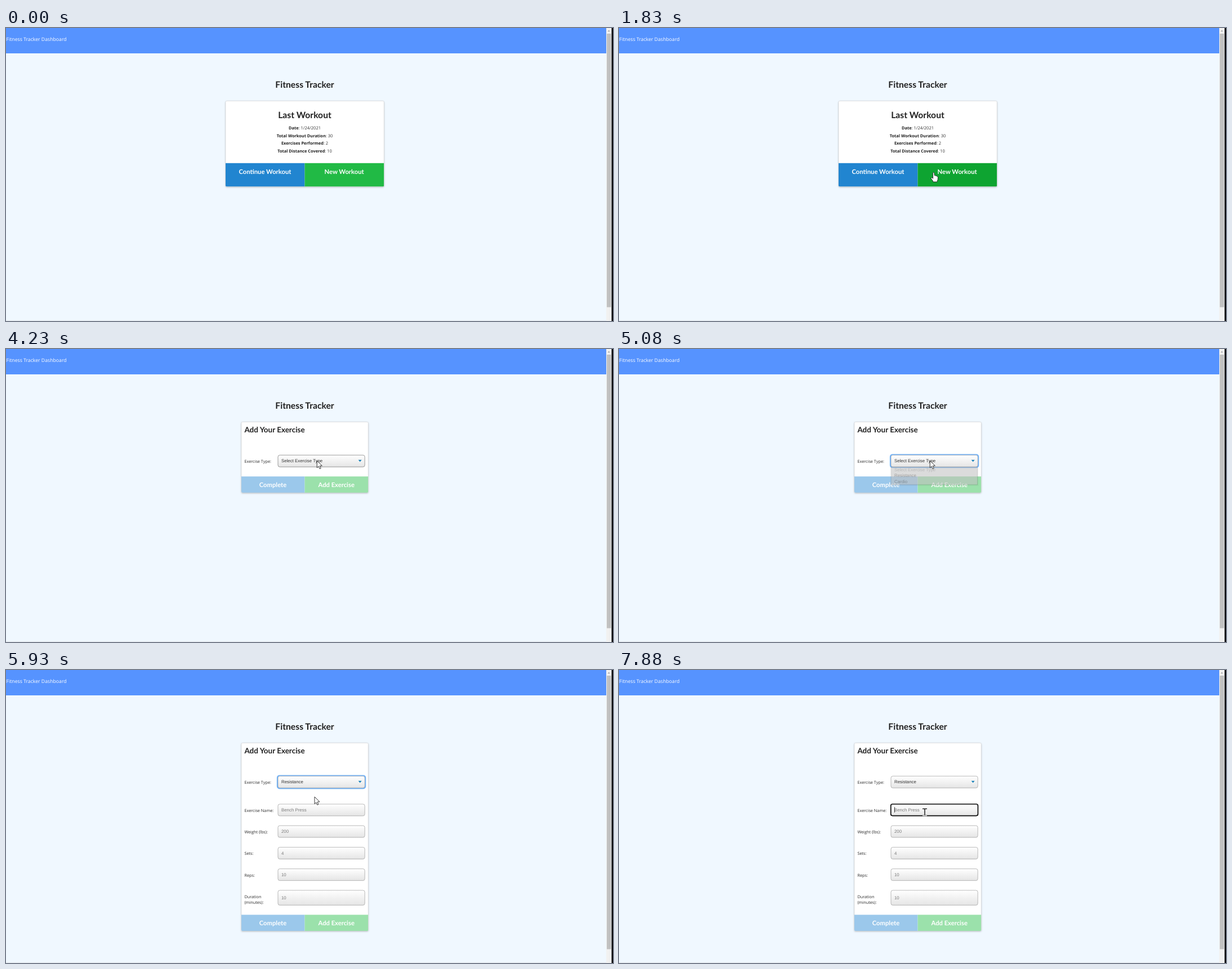
An HTML page with a canvas for the animation above (8000 ms loop, 1078 by 520 pixels).

```html
<!DOCTYPE html>
<html lang="en">
<head>
<meta charset="utf-8">
<title>Fitness Tracker</title>
<style>
html, body { margin: 0; width: 100%; height: 100%; overflow: hidden; background: #f0f8ff; }
canvas { display: block; width: 1078px; height: 520px; }
</style>
</head>
<body>
<canvas id="stage" width="1078" height="520"></canvas>
<script>
const ctx = document.getElementById('stage').getContext('2d');
const LOOP = 8000;
const UI = '"Open Sans", "Noto Sans", sans-serif';
const HEAD = 'Lato, sans-serif';
const FIELD = '"Liberation Sans", Arial, sans-serif';
const INK = '#212121';
const MID = 530.5;

// Pointer moves: start, end, steps, from, to
const moves = [
  [530, 590, 2, [1043, 520], [1065, 512]],
  [750, 1520, 11, [1065, 512], [557, 252]],
  [1590, 1830, 4, [557, 252], [558.5, 256.5]],
  [3370, 4060, 10, [558.5, 256.5], [552.3, 198.3]],
  [5470, 5700, 4, [552.3, 198.3], [548, 225]],
  [6480, 6720, 4, [548, 225], [543, 251.5]]
];
const clicks = [[1670, 1830], [4060, 4230], [5850, 5930], [6870, 7020]];

const within = (t, a, b) => t >= a && t < b;
const mix = (a, b, k) => a + (b - a) * k;
const ease = k => k * k * (3 - 2 * k);

// Fraction done of a stepped change whose first step shows at a, last at b
function stepped(t, a, b, n) {
  if (t < a) return 0;
  if (t >= b) return 1;
  return (Math.floor((t - a) / (b - a) * (n - 1)) + 1) / n;
}

function pointerAt(t) {
  let pos = null;
  for (const [a, b, n, from, to] of moves) {
    if (t < a) break;
    const k = ease(stepped(t, a, b, n));
    pos = [mix(from[0], to[0], k), mix(from[1], to[1], k)];
  }
  return pos;
}

function rect(x, y, w, h, color) {
  ctx.fillStyle = color;
  ctx.fillRect(x, y, w, h);
}

function round(x, y, w, h, r) {
  ctx.beginPath();
  ctx.roundRect(x, y, w, h, r);
}

function text(str, x, y, font, color, align = 'left') {
  ctx.font = font;
  ctx.fillStyle = color;
  ctx.textAlign = align;
  ctx.fillText(str, x, y);
}

function poly(points) {
  ctx.beginPath();
  points.forEach(([x, y]) => ctx.lineTo(x, y));
  ctx.closePath();
}

function page() {
  rect(0, 0, 1078, 520, '#f0f8ff');
  rect(0, 0, 1066, 45, '#5693ff');
  text('Fitness Tracker Dashboard', 0.6, 23.4, '8.7px ' + UI, '#fff');
  text('Fitness Tracker', MID, 106.3, '700 15.7px ' + HEAD, INK, 'center');
  rect(0, 519, 1066, 1, '#e2e6ea');
  rect(1066, 0, 9.5, 520, '#f1f1f1');
  rect(1067, 10, 7.5, 485.5, '#c1c1c1');
  ctx.fillStyle = '#a3a3a3';
  poly([[1068.4, 6.3], [1070.6, 3.8], [1072.8, 6.3]]);
  ctx.fill();
  rect(1075.5, 0, 2.5, 520, '#0b0b0d');
}

function card(x, y, w, h, split, left, right) {
  ctx.save();
  ctx.shadowColor = 'rgba(0,0,0,.28)';
  ctx.shadowBlur = 3;
  ctx.shadowOffsetY = 1;
  ctx.fillStyle = '#fff';
  round(x, y, w, h, 2.2);
  ctx.fill();
  ctx.restore();
  ctx.strokeStyle = '#d4d4d5';
  ctx.lineWidth = 0.6;
  ctx.stroke();
  ctx.save();
  ctx.clip();
  rect(x, split, MID - x, y + h - split, left);
  rect(MID, split, x + w - MID, y + h - split, right);
  ctx.restore();
}

function summary(t) {
  const k = stepped(t, 1590, 1750, 3);
  const green = `rgb(${mix(33, 14, k)},${mix(186, 164, k)},${mix(69, 49, k)})`;
  card(390, 129.5, 281.3, 152, 239.8, '#2185d0', green);
  text('Last Workout', MID, 159.9, '700 15.7px ' + HEAD, INK, 'center');
  const bold = '700 7.4px ' + UI, plain = '7.5px ' + UI;
  [['Date', '1/24/2021'], ['Total Workout Duration', '30'],
   ['Exercises Performed', '2'], ['Total Distance Covered', '10']].forEach(([name, val], i) => {
    const y = 180 + i * 13.55;
    val = ': ' + val;
    ctx.font = plain;
    const valWidth = ctx.measureText(val).width;
    ctx.font = bold;
    const nameWidth = ctx.measureText(name).width;
    const x = MID - (nameWidth + valWidth) / 2;
    text(name, x, y, bold, INK);
    text(val, x + nameWidth, y, plain, '#333');
  });
  const label = '700 11.23px ' + HEAD;
  text('Continue Workout', 460, 258.8, label, '#fff', 'center');
  text('New Workout', 600.6, 258.8, label, '#fff', 'center');
}

function field(y, h, str, color, border = '#aaa') {
  const fill = ctx.createLinearGradient(0, y, 0, y + h);
  fill.addColorStop(0, '#fff');
  fill.addColorStop(1, '#e5e5e5');
  round(482.6, y - 0.1, 155, h + 1.1, 3.5);
  ctx.fillStyle = 'rgba(0,0,0,.05)';
  ctx.fill();
  round(483, y, 154.2, h, 3.3);
  ctx.fillStyle = fill;
  ctx.fill();
  ctx.strokeStyle = border;
  ctx.lineWidth = 0.8;
  ctx.stroke();
  text(str, 489, y + h / 2 + 2.7, '7.86px ' + FIELD, color);
}

function label(str, y) {
  text(str, 423.4, y, '7.3px ' + UI, '#2b2b2b');
}

function outline(y, h, color, width) {
  round(482.7, y, 154.8, h, 3);
  ctx.strokeStyle = color;
  ctx.lineWidth = width;
  ctx.stroke();
}

function form(t) {
  const open = t >= 5930;
  const split = open ? 434.4 : 226.2;
  card(418, 129.5, 225.3, split + 28.7 - 129.5, split, '#9bc8eb', '#9be1ab');
  text('Add Your Exercise', 423.4, 148.4, '700 13.48px ' + HEAD, INK);
  const btn = '700 11.23px ' + HEAD;
  text('Complete', 474, split + 18.8, btn, '#fff', 'center');
  text('Add Exercise', 586.7, split + 18.8, btn, '#fff', 'center');

  label('Exercise Type:', 202);
  if (within(t, 5010, 6870)) outline(188.2, 21.2, 'rgba(59,153,252,.75)', 3.6);
  field(188.3, 20.9, open ? 'Resistance' : 'Select Exercise Type', '#303030',
    within(t, 3980, 5010) ? '#888' : '#aaa');
  ctx.fillStyle = '#1480b8';
  poly([[625.7, 196.7], [631.7, 196.7], [628.7, 200.2]]);
  ctx.fill();

  if (open) extraFields(t);
  else if (t >= 5010) menu(t);
}

function extraFields(t) {
  [['Exercise Name:', 238, 20.8, 'Bench Press', 251.6],
   ['Weight (lbs):', 276.2, 20.8, '200', 289.8],
   ['Sets:', 314.6, 20.8, '4', 328],
   ['Reps:', 352.8, 20.8, '10', 366.5],
   ['Duration', 391, 26.3, '10', 404.6]].forEach(([name, y, h, hint, base]) => {
    label(name, base);
    field(y, h, hint, '#7b7b7b');
  });
  label('(minutes):', 415.2);
  if (t >= 6870) {
    outline(238, 20.6, '#101010', 1.7);
    if (!within(t, 7420, 7880)) rect(489, 243.3, 0.9, 9.6, '#222');
  }
}

function menu(t) {
  const font = '7.86px ' + FIELD;
  const hot = t >= 5550;
  ctx.save();
  ctx.globalAlpha = stepped(t, 5010, 5160, 3);
  rect(484, 211, 154.5, 32, 'rgba(0,0,0,.12)');
  rect(482.7, 209.2, 154.3, 32, '#6d6d6d');
  rect(483.5, 209.9, 152.7, 30.5, '#fff');
  if (hot) rect(483.5, 220, 152.7, 10.2, '#1e90ff');
  text('Select Exercise Type', 489, 217.2, font, '#777');
  text('Resistance', 489, 227.4, font, hot ? '#fff' : '#222');
  text('Cardio', 489, 237.7, font, '#222');
  ctx.restore();
}

function arrow() {
  poly([[0, 0], [0, 12.6], [2.9, 10], [4.8, 14.4], [6.9, 13.5], [5, 9.2], [9, 8.9]]);
}

function hand() {
  ctx.beginPath();
  ctx.moveTo(-1.1, 0.6);
  ctx.quadraticCurveTo(0.2, -1, 1.4, 0.6);
  ctx.lineTo(1.8, 5.4);
  ctx.quadraticCurveTo(3.2, 4.4, 4.2, 6);
  ctx.quadraticCurveTo(5.6, 5.2, 6.4, 6.9);
  ctx.quadraticCurveTo(7.8, 6.6, 8, 8.4);
  ctx.lineTo(7.8, 12);
  ctx.lineTo(6.4, 16.6);
  ctx.lineTo(-0.6, 16.6);
  ctx.lineTo(-1.4, 14.4);
  ctx.lineTo(-4.4, 10.6);
  ctx.quadraticCurveTo(-4.7, 8.6, -2.8, 9);
  ctx.lineTo(-0.9, 10.6);
  ctx.closePath();
}

function beam() {
  ctx.globalCompositeOperation = 'difference';
  ctx.fillStyle = '#fff';
  poly([[-4, -5.8], [4, -5.8], [4, -4.4], [0.7, -4.4], [0.7, 6.2], [4, 6.2],
        [4, 7.4], [-4, 7.4], [-4, 6.2], [-0.7, 6.2], [-0.7, -4.4], [-4, -4.4]]);
  ctx.fill();
}

function pointer(t) {
  const pos = pointerAt(t);
  if (!pos) return;
  const [x, y] = pos;
  ctx.save();
  ctx.translate(x, y);
  if (clicks.some(([a, b]) => within(t, a, b))) {
    ctx.beginPath();
    ctx.arc(t > 6800 ? -1.5 : -0.3, -0.3, 10, 0, Math.PI * 2);
    ctx.fillStyle = 'rgba(255,238,0,.72)';
    ctx.fill();
  }
  if (t >= 6640) beam();
  else {
    if (within(t, 1520, 3370)) hand(); else arrow();
    ctx.lineJoin = 'round';
    ctx.fillStyle = '#fff';
    ctx.fill();
    ctx.strokeStyle = '#222';
    ctx.lineWidth = 0.9;
    ctx.stroke();
  }
  ctx.restore();
}

function draw(now) {
  const t = now % LOOP;
  ctx.textRendering = 'geometricPrecision';
  page();
  if (t < 3060) summary(t); else form(t);
  pointer(t);
}

const start = performance.now();
function tick() {
  draw(performance.now() - start);
  requestAnimationFrame(tick);
}
tick();
</script>
</body>
</html>
```
